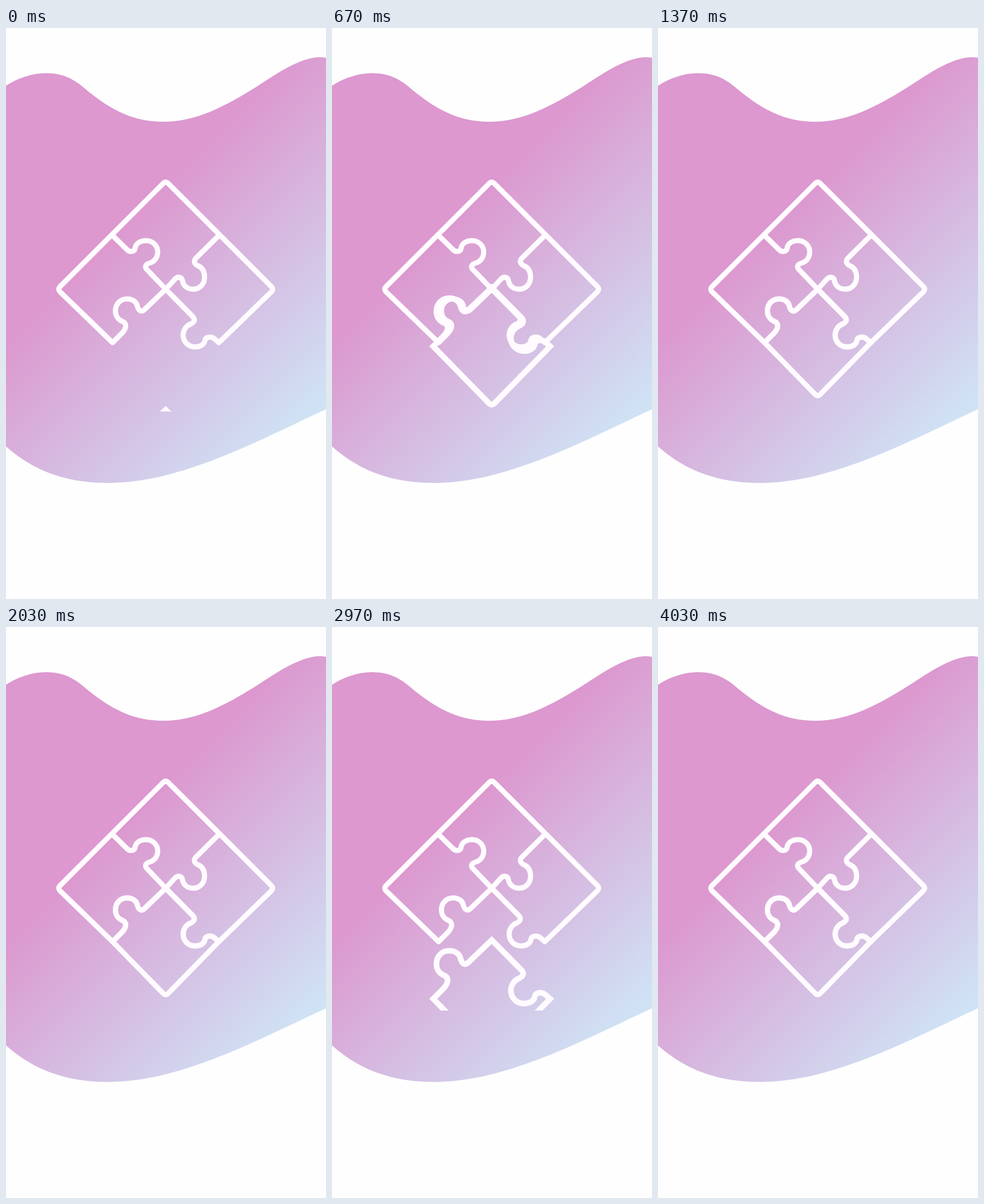
Recreate the animation shown at these times as an HTML page. Size 560 by 999 pixels, loop 4.06 s.

```html
<!DOCTYPE html>
<html lang="en">
<head>
<meta charset="utf-8">
<title>Puzzle</title>
<style>
  html, body { margin: 0; width: 100%; height: 100%; overflow: hidden; background: #fefefe; }
  svg { display: block; width: 100%; height: 100%; }
  .lines { fill: none; stroke: #fffbff; stroke-width: 9; }
</style>
</head>
<body>
<svg viewBox="0 0 560 999">
  <defs>
    <linearGradient id="sky" gradientUnits="userSpaceOnUse" x1="275" y1="275" x2="607" y2="607">
      <stop offset="0" stop-color="#dc98cf"/>
      <stop offset="1" stop-color="#cfe3f5"/>
    </linearGradient>
    <clipPath id="icon"><rect x="65" y="243" width="429" height="428"/></clipPath>
  </defs>
  <path fill="url(#sky)" d="M0 101C20 88 45 79 70 79C100 79 120 90 138 106C180 141 220 164 275 164
    C335 164 385 135 430 108C460 90 510 51 550 51L560 52V667C430 728 300 796 180 796C100 796 45 772 0 732Z"/>
  <g class="lines" clip-path="url(#icon)">
    <g id="fixed" stroke-linejoin="round"></g>
    <path id="piece" stroke-linejoin="miter"/>
  </g>
</svg>
<script>
  const PERIOD = 2700, LOOP = 4060;
  const CX = 279.5, CY = 551;

  // Seams between the pieces; the lower two also outline the moving piece.
  const upperLeft = 'M186.5 363L211 387C216 393 225 392 226 385C227 377 235 372 245 372' +
    'C257 372 265.5 381 265.5 392C265.5 402 259 409 252 411C244 413 242 418 247 423L279.5 457';
  const upperRight = 'M372.5 363L332 403C327 409 331 414 336 416C343 419 347.5 426 347.5 436' +
    'C347.5 448 339 457 327 457C317 457 310 450 309 443C308 435 300 434 295 440L279.5 457';
  const lowerLeft = 'L203 534C212 524 211 516 203 513C196 510 191.5 503 191.5 495' +
    'C191.5 483 200 474 212 474C222 474 229 480 230 487C232 495 237 498 243 492L279.5 457';
  const lowerRight = 'L327 505C332 511 329 515 323 518C315 521 310 529 310 537' +
    'C310 549 319 558 331 558C341 558 347 553 348 547C349 540 359 539 365 544L372.5 550.5';
  const frame = 'L465 461Q468 457 465 453L283.5 271.5Q279.5 268 275.5 271.5L94 453Q91 457 94 461';

  const fixed = document.getElementById('fixed');
  const piece = document.getElementById('piece');
  fixed.innerHTML = [
    'M186.5 550.5' + lowerLeft + lowerRight + frame + 'Z', upperLeft, upperRight
  ].map(d => `<path d="${d}"/>`).join('');
  piece.setAttribute('d',
    'M186.5 550.5' + lowerLeft + lowerRight + 'L283.5 641.5Q279.5 645 275.5 641.5Z');

  const ease = (t, start, end) => {
    const p = Math.min(1, Math.max(0, (t - start) / (end - start)));
    return p * p * (3 - 2 * p);
  };

  function draw(now) {
    const t = now % LOOP % PERIOD;
    const rise = 1 - ease(t, 0, 500);
    const loose = 1 - ease(t, 700, 900);
    const y = CY + 214 * rise + 6.5 * loose;
    piece.setAttribute('transform',
      `translate(${CX} ${y}) scale(${1 + 0.1 * loose}) translate(${-CX} ${-CY})`);
    requestAnimationFrame(draw);
  }
  draw(0);
</script>
</body>
</html>
```
